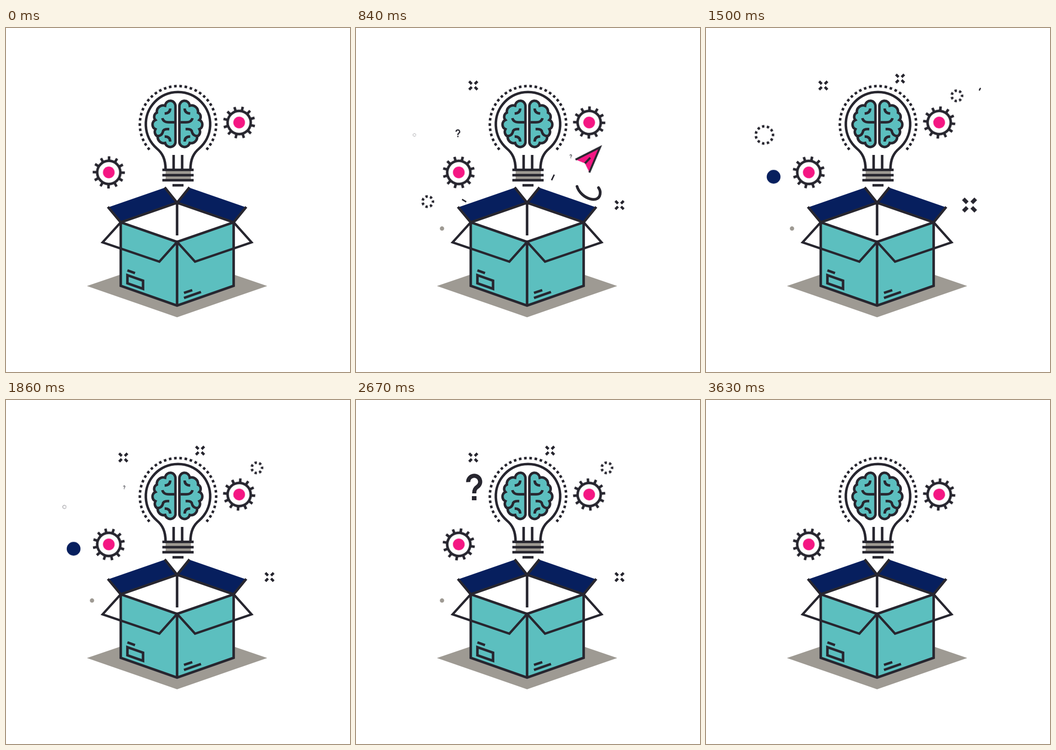
An HTML page that plays this animation: 748 px wide and 748 px high, repeating every 3.66 s.

```html
<!DOCTYPE html>
<html lang="en">
<head>
<meta charset="utf-8">
<title>Idea box</title>
<style>
  html, body { margin: 0; width: 100%; height: 100%; overflow: hidden; background: #fff; }
  svg { display: block; width: 748px; height: 748px; }
  .line { fill: none; stroke: #27262f; stroke-width: 5.5; }
  .teal { fill: #5cbfbf; }
  .navy { fill: #071f5e; }
  .grey { fill: #9e9a93; }
  .pink { fill: #f41783; }
  .white { fill: #fff; }
  .ink { fill: #27262f; }
  .ray { stroke-width: 3.2; stroke-dasharray: 4 200; stroke-dashoffset: 4; }
  #trail { stroke-width: 6; stroke-linecap: round; opacity: 0; }
  #plane { offset-path: path("M395 430C400 300 470 300 480 342C486 371 532 386 531 357C531 335 470 316 495.5 297.5C550 258 690 285 680 205C674 160 570 168 598 129"); offset-rotate: auto; }
</style>
</head>
<body>
<svg viewBox="0 0 748 748">
  <defs>
    <path id="cross" class="line" d="M-9-9l5.7 5.7M9-9l-5.7 5.7M-9 9l5.7-5.7M9 9l-5.7-5.7"/>
    <circle id="ring" class="line" r="18.7" pathLength="22" stroke-dasharray="1 1" stroke-dashoffset=".5"/>
    <circle id="ringlet" class="line" r="11.3" pathLength="14" stroke-dasharray="1 1" stroke-dashoffset=".5"/>
    <circle id="dot" class="navy" r="15"/>
    <circle id="speck" class="grey" r="4.7"/>
    <g id="ask">
      <path class="line" style="stroke-width:9" d="M-13-11.5A13 13 0 1 1 6.5-1Q0 3 0 13"/>
      <path class="ink" d="M-5 19h10v9h-10z"/>
    </g>
    <g id="gear">
      <g id="teeth" class="line"></g>
      <circle class="line" r="25.2"/>
      <circle class="pink" r="12.7"/>
    </g>
    <g id="lobe">
      <path class="line" style="fill:#5cbfbf" d="M368.5 172A11 12 0 0 0 346 169A14 14 0 0 0 328 184A10 10 0 0 0 325 200A11 11 0 0 0 325 220A11.5 11.5 0 0 0 330 236A13 13 0 0 0 346 250A11.5 11.5 0 0 0 368.5 249Z"/>
      <path class="line" d="M345 186Q357 185 357 175M340 196Q342 205 354 205H366M341 226Q342 219 355 220M328 235Q339 235 341 226M357 247Q357 236 345 236"/>
    </g>
  </defs>

  <path class="grey" d="M176 561L372 494L568 561L372 629Z"/>
  <g id="rays" class="line"></g>
  <path id="trail" class="line" pathLength="100" d="M395 430C400 300 470 300 480 342C486 371 532 386 531 357C531 335 470 316 495.5 297.5C550 258 690 285 680 205C674 160 570 168 598 129"/>
  <g id="plane">
    <path class="pink" d="M0-21L58 0L0 21L8 0Z"/>
    <path class="line" style="stroke-width:4.5" d="M0-20.5L56 0L0 20.5M8 0H25"/>
  </g>
  <g id="items"></g>
  <use id="gearL" href="#gear"/>
  <use id="gearR" href="#gear"/>

  <g id="bulb">
    <path class="line" d="M312 264.5A83 83 0 1 1 436 264.5" pathLength="67" stroke-dasharray="1 1"/>
    <path class="line" style="fill:#fff" d="M347 308C347 285 340 272 328 262A70 70 0 1 1 420 262C408 272 401 285 401 308"/>
    <use href="#lobe"/>
    <use href="#lobe" transform="matrix(-1 0 0 1 745.5 0)"/>
    <path class="grey" d="M347 309h55v22h-55z"/>
    <path class="line" d="M364.5 276V307M383 276V307M340 308.5H408M340 320H408M340 331H408M362 342H386"/>
  </g>

  <g id="box">
    <path class="white" d="M249.5 422L372 380L495 422L372 465Z"/>
    <path class="navy" d="M222 390L346 347L372 380L249.5 422ZM522 390L398 347L372 380L495 422Z"/>
    <path class="line" d="M221.5 389L249.5 422.5L372 380L495 422.5L522.5 389M345 346.5L372 380L399 346.5M372 380V451"/>
    <path class="white" d="M249.5 422.5L210 466L249.5 479ZM495 422.5L534 466L495 479Z"/>
    <path class="teal" d="M249.5 422.5L372 465L495 422.5V560.5L372 603.5L249.5 560.5Z"/>
    <path class="line" d="M249.5 422.5L372 465L495 422.5V560.5L372 603.5L249.5 560.5ZM372 465V603"/>
    <path class="line" style="stroke-width:5" d="M249.5 422.5L210 466L333.5 508L372 465L411 508L534 466L495 422.5"/>
    <path class="line" d="M264 527L280.5 533M264 537.5L298 549.5V567L264 555ZM387 576L405 570M387 587L424 574"/>
  </g>
</svg>
<script>
const LOOP = 3660;
const $ = id => document.getElementById(id);

function add(parent, tag, attrs) {
  const el = document.createElementNS('http://www.w3.org/2000/svg', tag);
  for (const k in attrs) el.setAttribute(k, attrs[k]);
  return parent.appendChild(el);
}

// stops: [ms, value] pairs; style turns a value into CSS properties
function play(el, stops, style) {
  const all = [[0, stops[0][1]], ...stops, [LOOP, stops[stops.length - 1][1]]];
  el.animate(all.map(([ms, v]) => ({ offset: ms / LOOP, ...style(v) })),
    { duration: LOOP, iterations: Infinity });
}

for (let a = 0; a < 360; a += 30)
  add($('teeth'), 'path', { d: 'M0-27V-35', transform: `rotate(${a})` });

const spin = (x, y) => a => ({ transform: `translate(${x}px,${y}px) rotate(${a}deg)` });
play($('gearL'), [[0, 1], [1500, 132], [LOOP, 347]], spin(223.5, 314));
play($('gearR'), [[0, 13], [LOOP, -299]], spin(507, 205.5));

// a streak flies out of the box, then the item pops up, may pulse, and shrinks away
const items = [
  { shape: 'cross', x: 255, y: 125, from: 340, to: 2760, pulse: 960 },
  { shape: 'cross', x: 573, y: 385, from: 360, to: 2820, pulse: 1500 },
  { shape: 'cross', x: 422, y: 110, from: 1230, to: 2880, pulse: 2250 },
  { shape: 'ringlet', x: 156, y: 377.5, from: 320, to: 1150 },
  { shape: 'ringlet', x: 545.5, y: 147.5, from: 1140, to: 2790, fly: 752, bend: 'M385 440Q430 280 ' },
  { shape: 'ring', x: 127, y: 232.5, from: 815, to: 1700 },
  { shape: 'dot', x: 147, y: 323.5, from: 960, to: 2330, pulse: 1290, peak: 1.65, fly: 696 },
  { shape: 'speck', x: 187, y: 436, from: 420, to: 2850 },
  { shape: 'ask', x: 221.5, y: 229, from: 794, to: 1200 },
  { shape: 'ask', x: 467, y: 279, from: 818, to: 1240 },
  { shape: 'ask', x: 257, y: 190, from: 1840, to: 3220 }
];

for (const { shape, x, y, from, to, pulse, peak = 1.5, fly = from - 240, bend = 'M372 456L' } of items) {
  const ray = add($('rays'), 'path', { class: 'ray', pathLength: 100, d: `${bend}${x} ${y}` });
  play(ray, [[fly, 4], [fly + 240, -100]], v => ({ strokeDashoffset: v }));

  const beat = pulse ? [[pulse - 115, 1], [pulse, peak], [pulse + 115, 1]] : [];
  play(add($('items'), 'use', { href: '#' + shape }),
    [[from, 0], [from + 160, 1], ...beat, [to, 1], [to + 200, 0]],
    s => ({ transform: `translate(${x}px,${y}px) scale(${s})` }));
}

play($('plane'), [[520, [0, 0]], [580, [10, 1]], [840, [47.9, 1]], [1080, [65.6, 1]], [1250, [86, 1]], [1400, [97, 0]]],
  ([d, s]) => ({ offsetDistance: d + '%', transform: `scale(${s})` }));

// [start, length, width, opacity]
play($('trail'), [[580, [0, 0, 6, 0]], [581, [0, 0, 6, 1]], [840, [26.3, 12.2, 6, 1]], [1200, [60, 14, 6, 1]],
  [1400, [88, 11, 6, 1]], [1500, [99, 0.6, 3, 1]], [1529, [100, 0.1, 2, 1]], [1530, [100, 0, 2, 0]]],
  ([start, len, width, opacity]) => ({
    strokeDashoffset: -start, strokeDasharray: `${len} 300`, strokeWidth: width, opacity
  }));
</script>
</body>
</html>
```
